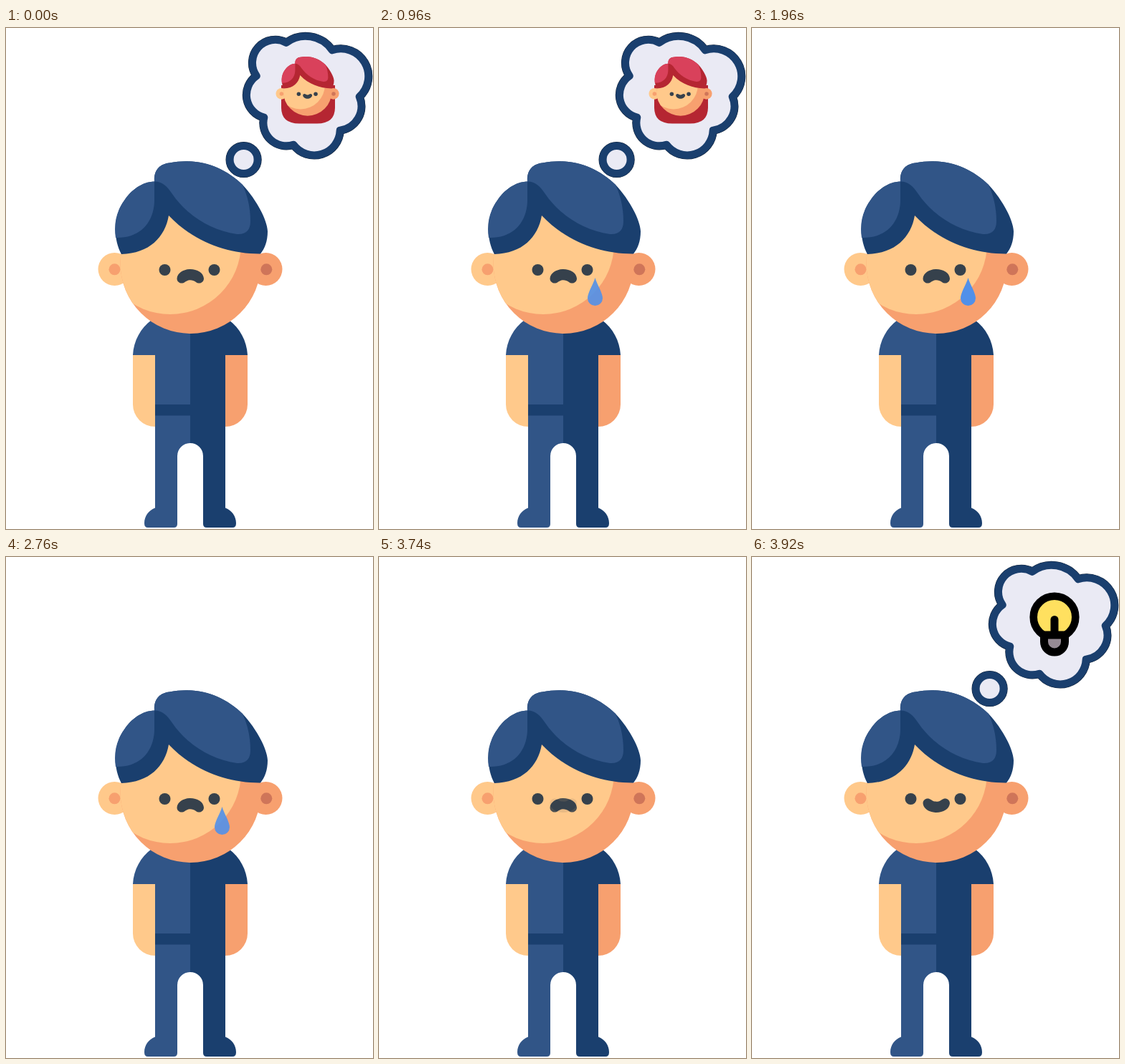
An HTML page that plays this animation: 512x700 px, repeating every 4720 ms.

```html
<!DOCTYPE html>
<html lang="en">
<head>
<meta charset="utf-8">
<title>Bright idea</title>
<style>
  html, body { margin: 0; width: 100%; height: 100%; overflow: hidden; background: #fff; }
  svg { display: block; width: 100%; height: 100%; }
</style>
</head>
<body>
<svg id="stage" viewBox="0 0 512 700"></svg>
<script>
const LOOP = 4720, STEP = 20, STEPS = 10;
const SKIN = '#ffc98b', SHADE = '#f7a06f', BLUSH = '#cf7559', INK = '#36414c';
const BLUE = '#315587', NAVY = '#1a3f6e', PALE = '#eaeaf4';
const ROSE = '#d9415b', RED = '#b52632';

const circle = (x, y, r, fill, extra = '') =>
  `<circle cx="${x}" cy="${y}" r="${r}" fill="${fill}" ${extra}/>`;
const path = (d, fill, extra = '') => `<path d="${d}" fill="${fill}" ${extra}/>`;

const sad = path(`M238.500 350C239 342 248 337 257.300 337S275.500 342 276 350C276 356 269 358.500 265 355
  C260 351.200 254.500 351.200 249.500 355C245.500 358.500 238.500 356 238.500 350Z`, INK);
const happy = `<g transform="matrix(1 0 0 -1 0 694)">${sad}</g>`;

function head(light, dark, mouth) {
  return circle(151.5, 337, 23, SKIN) + circle(151.5, 337.3, 8, SHADE)
    + circle(362.5, 337, 23, SHADE) + circle(363.3, 337.3, 8, BLUSH)
    + circle(257.5, 329, 98, SHADE)
    + circle(229, 301, 99, SKIN, 'clip-path="url(#face)"')
    + path(`M161 316C150 296 148.500 264 165 241C175 226 190 215 207 214.500C206 198 215 190 228 188.500
      C268 181 303 193 330 219C347 237 364 266 365 284C365 298 361 308 355 315.500
      C310 316 262 299 227 262C222 292 200 315 161 316Z`, dark)
    + path(`M153 293C150 274 154 256 165 241C175 226 190 215 207 214.500V242
      C206 272 187 294 153 293Z`, light)
    + path(`M207 214.500C206 198 215 190 228 188.500C268 181 303 193 330 219
      C338 236 341 254 341 270C341 282 335 289 322 288C285 283 252 261 232 232
      C225 221 217 214 207 214.500Z`, light)
    + circle(221.5, 338, 8, INK) + circle(290.5, 338, 8, INK) + mouth;
}

function half(shirt, arm) {
  return path('M177 457C178 437 188 419 203 408L225 395H257V580A18 18 0 0 0 239 598V693Q239 698 234 698'
      + 'H198Q193 698 193 692C193 682 199 674 208 670.500V457Z', shirt)
    + path('M177 457H208V557A31 31 0 0 1 177 526Z', arm);
}

// Dark hairline under the coloured outline
const outlined = d => path(d, NAVY, 'stroke="#0b1c33" stroke-width="11.6" stroke-linejoin="round"')
  + path(d, PALE, `stroke="${NAVY}" stroke-width="10.6" stroke-linejoin="round"`);

const cloud = outlined(`M349.500 67A32 32 0 0 1 391 20.500A45 45 0 0 1 455 31A38.500 38.500 0 0 1 493 96
  A34 34 0 0 1 466 143A36 36 0 0 1 401 163A32 32 0 0 1 360 125A32.400 32.400 0 0 1 349.500 67Z`)
  + outlined('M312.300 184A19.300 19.300 0 0 1 350.900 184A19.300 19.300 0 0 1 312.300 184Z');

const girl = path('M384 80H459V111Q459 133.500 434 133.500H409Q384 133.500 384 111Z', RED)
  + `<g transform="translate(332.400 -23.800) scale(.343)">${head(ROSE, RED, happy)}</g>`;

const bulb = circle(422, 84, 29.3, '#ffe05f', 'stroke="#000" stroke-width="10.6"')
  + path('M407.500 109H436.500V118.500A14.500 14.500 0 0 1 407.500 118.500Z', '#968b95',
    'stroke="#000" stroke-width="11" stroke-linejoin="round"')
  + path('M422 87.500V106', 'none', 'stroke="#000" stroke-width="11" stroke-linecap="round"');

const stage = document.getElementById('stage');
stage.innerHTML = `<defs><clipPath id="face">${circle(257.5, 329, 98, SKIN)}</clipPath></defs>
  <g id="thought">${cloud}<g id="girl">${girl}</g><g id="bulb">${bulb}</g></g>
  ${half(BLUE, SKIN)}
  <g transform="matrix(-1 0 0 1 514 0)">${half(NAVY, SHADE)}</g>
  <rect x="208" y="526" width="50" height="15.500" fill="${NAVY}"/>
  ${head(BLUE, NAVY, sad)}
  <g id="smile"><rect x="236" y="335" width="42" height="24" fill="${SKIN}"/>${happy}</g>
  ${path('M301.500 349C304 358 312 370 312 377.500A10.500 10.500 0 0 1 291 377.500C291 370 299 358 301.500 349Z',
    '#5190e9', 'id="tear"')}`;

const [thought, girlPart, bulbPart, smile, tear] =
  ['thought', 'girl', 'bulb', 'smile', 'tear'].map(id => document.getElementById(id));
const show = (el, on) => el.setAttribute('visibility', on ? 'inherit' : 'hidden');

// Stepped fade from 0 to 1 that begins at start
const fade = (t, start) =>
  Math.min(STEPS, Math.max(0, Math.floor((t - start) / STEP) + 1)) / STEPS;

function render(t) {
  const joy = fade(t, 3740);
  tear.setAttribute('opacity', fade(t, 800) - fade(t, 2760));
  smile.setAttribute('opacity', joy);
  // The bubble switches hard, halfway through its fade
  const missing = fade(t, 1780) <= 0.5, idea = joy >= 0.5;
  show(thought, missing || idea);
  show(girlPart, missing);
  show(bulbPart, idea);
}

function tick() {
  render(performance.now() % LOOP);
  requestAnimationFrame(tick);
}
tick();
</script>
</body>
</html>
```
